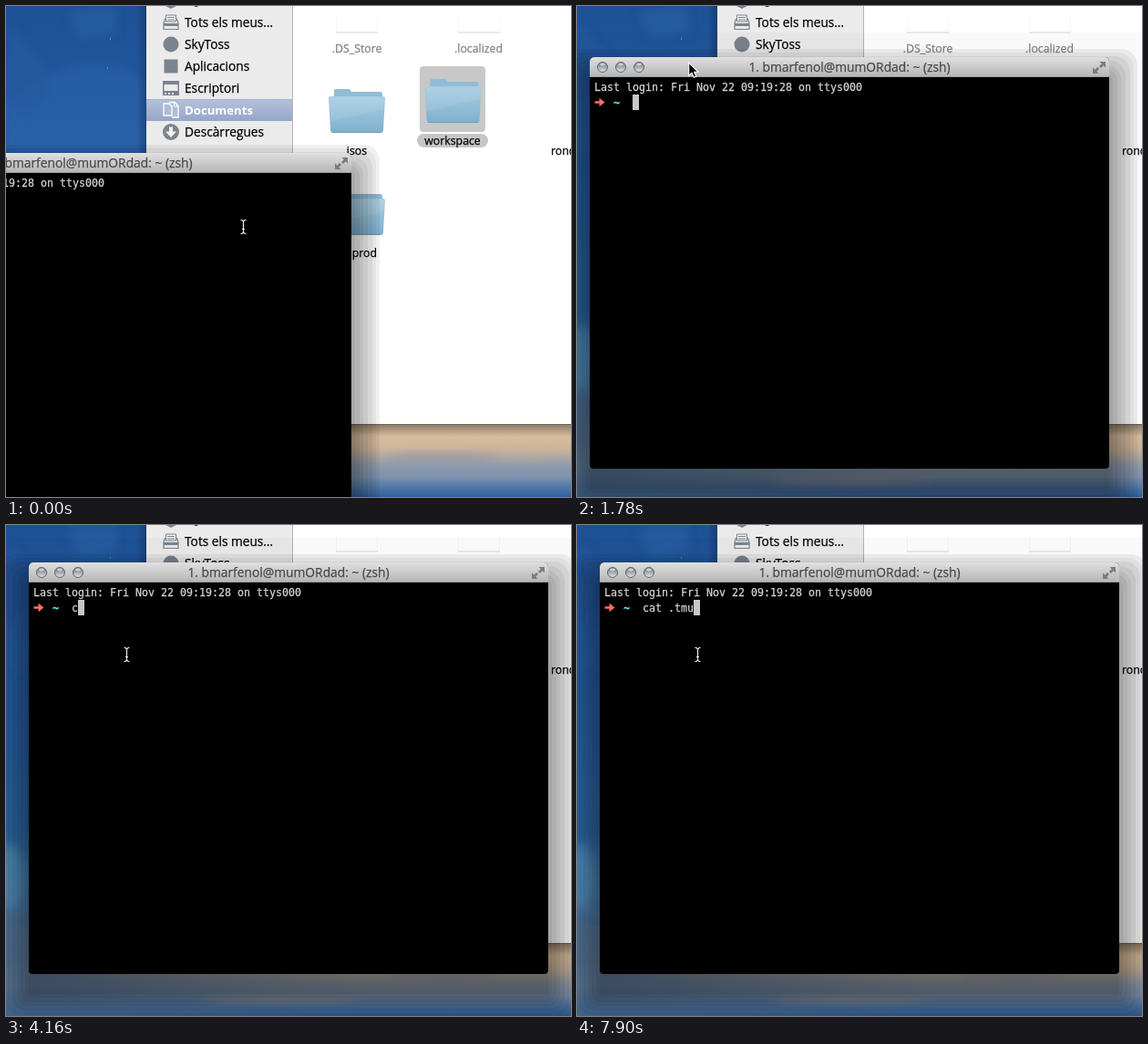
Animation of 620x538 px, one loop 8000 ms. Source, as an HTML page:

```html
<!DOCTYPE html>
<html lang="ca">
<head>
<meta charset="utf-8">
<title>Terminal</title>
<style>
html, body { margin: 0; width: 100%; height: 100%; overflow: hidden; }
body { position: relative; background: #1d4f94; color: #000; }
svg { display: block; }
#desk, #pointers { position: absolute; left: 0; top: 0; }
text {
  font-family: "Open Sans", "Noto Sans", sans-serif; font-weight: 500;
  fill: currentColor; stroke: currentColor; stroke-width: .25px;
}
.side { font-size: 13.7px; }
.side .on { color: #fff; font-weight: 700; font-size: 13.2px; stroke: none; }
.label { font-size: 12.3px; text-anchor: middle; }
.dim { color: #808080; }
.title { color: #484848; font-size: 13.8px; text-anchor: middle; }
.mono { font: 11.63px "DejaVu Sans Mono", monospace; color: #d2d2d2; white-space: pre; }
.mono.path { color: #5ff5fb; font-weight: 700; }

#term {
  position: absolute; left: 0; top: 0; width: 570px; height: 451px;
  border-radius: 5px 5px 4px 4px;
  box-shadow:
    0 22px 0 0 rgba(0,0,0,.05), 0 22px 0 4px rgba(0,0,0,.06),
    0 22px 0 9px rgba(0,0,0,.06), 0 22px 0 13px rgba(0,0,0,.06),
    0 22px 0 18px rgba(0,0,0,.06), 0 22px 0 23px rgba(0,0,0,.06),
    0 22px 0 27px rgba(0,0,0,.05), 0 22px 0 31px rgba(0,0,0,.06);
}
#term::before {
  content: ""; position: absolute; z-index: -1; inset: -27px -49px -90px;
  background: rgba(0,0,0,.025);
}
#term svg { border-radius: inherit; overflow: hidden; }

#term, #term::before, #caret, #beam, #arrow { animation: 8s step-end infinite; }
#term { animation-name: drag; }
#term::before { animation-name: haze; }
#caret { animation-name: type; }
#beam { animation-name: beam; }
#arrow { animation-name: arrow; }

@keyframes drag {
  0% { transform: translate(-191px, 161px); }
  18.625% { transform: translate(-14px, 96px); }
  20.375% { transform: translate(2px, 87px); }
  22.25% { transform: translate(14px, 56px); }
  24.125% { transform: translate(20px, 40px); }
  26% { transform: translate(23px, 39px); }
  27.75% { transform: translate(24px, 41px); }
  29.625%, 100% { transform: translate(25px, 41px); }
}
@keyframes haze {
  0% { opacity: 0; }
  18.625%, 100% { opacity: 1; }
}
@keyframes type {
  0% { transform: translateX(0); }
  52% { transform: translateX(7px); }
  53.875% { transform: translateX(14px); }
  59.5% { transform: translateX(21px); }
  63.125% { transform: translateX(28px); }
  85.625% { transform: translateX(35px); }
  87.5% { transform: translateX(42px); }
  95% { transform: translateX(49px); }
  98.75%, 100% { transform: translateX(56px); }
}
@keyframes beam {
  0% { transform: translate(257px, 234px); }
  1.75% { transform: translate(236px, 209px); }
  3.625% { transform: translate(203px, 185px); }
  5.5% { transform: translate(63px, 184px); }
  7.375% { transform: translate(-40px, 184px); }
  33.25% { transform: translate(129px, 116px); }
  35.125%, 100% { transform: translate(129px, 134px); }
}
@keyframes arrow {
  0% { transform: translate(-40px, 0); }
  18.625% { transform: translate(108px, 101px); }
  20.375% { transform: translate(115px, 84px); }
  22.25% { transform: translate(122px, 61px); }
  24.125% { transform: translate(129px, 51px); }
  26% { transform: translate(133px, 50px); }
  27.75% { transform: translate(134px, 51px); }
  33.25%, 100% { transform: translate(-40px, 0); }
}
</style>
</head>
<body>
<svg id="desk" width="620" height="538">
  <defs>
    <linearGradient id="sea" x2="0" y2="1">
      <stop offset="0" stop-color="#1d5095"/>
      <stop offset=".25" stop-color="#265ca4"/>
      <stop offset=".62" stop-color="#2c68a6"/>
      <stop offset=".72" stop-color="#437fb2"/>
      <stop offset=".86" stop-color="#56779d"/>
      <stop offset=".94" stop-color="#5e7a9c"/>
      <stop offset="1" stop-color="#46709e"/>
    </linearGradient>
    <linearGradient id="dusk" x2="0" y2="1">
      <stop offset=".19" stop-color="#c8ad90"/>
      <stop offset=".3" stop-color="#d8bd9d"/>
      <stop offset=".45" stop-color="#d0b79c"/>
      <stop offset=".55" stop-color="#b0a7a1"/>
      <stop offset=".65" stop-color="#8f9bac"/>
      <stop offset=".78" stop-color="#7c92ae"/>
      <stop offset=".88" stop-color="#557ba7"/>
      <stop offset="1" stop-color="#2f5f9a"/>
    </linearGradient>
    <linearGradient id="reach">
      <stop offset="0" stop-color="#fff" stop-opacity="0"/>
      <stop offset=".3" stop-color="#fff" stop-opacity=".5"/>
      <stop offset=".62" stop-color="#fff"/>
    </linearGradient>
    <mask id="east"><rect y="440" width="620" height="98" fill="url(#reach)"/></mask>
    <linearGradient id="shadeL">
      <stop offset="0" stop-opacity="0"/><stop offset="1" stop-opacity=".22"/>
    </linearGradient>
    <linearGradient id="shadeB" x2="0" y2="1">
      <stop offset="0" stop-opacity=".3"/><stop offset="1" stop-opacity="0"/>
    </linearGradient>
    <linearGradient id="pick" x2="0" y2="1">
      <stop offset="0" stop-color="#b5c1da"/><stop offset="1" stop-color="#95a7c8"/>
    </linearGradient>
    <linearGradient id="front" x2="0" y2="1">
      <stop offset="0" stop-color="#a9cee3"/><stop offset="1" stop-color="#7fb0cd"/>
    </linearGradient>
    <filter id="soft"><feGaussianBlur stdDeviation="5"/></filter>
    <g id="folder">
      <path d="M6 12V3q0-2 2-2h14q2 0 2 2l1 1h32q2 0 2 2v6z" fill="#90bcd5"/>
      <path d="M2 9h58q2 0 2 2l-2 35q0 3-3 3H5q-3 0-3-3L0 11q0-2 2-2z" fill="url(#front)"/>
      <path d="M1 11h60l-1 12L2 37z" fill="#fff" opacity=".08"/>
      <path d="M4 48.500h54" stroke="#6d9dbb"/>
    </g>
    <g id="sheet">
      <path d="M.5 10V29M45.500 10V29" stroke="#f7f7f7"/>
      <path d="M0 28.500H46v1H0z" fill="#d8d8d8"/>
    </g>
  </defs>

  <rect width="620" height="538" fill="url(#sea)"/>
  <g filter="url(#soft)">
    <path d="M66 4L122 0V30L80 36z" fill="#2b62a8" opacity=".5"/>
    <path d="M0 108Q40 70 88 66T154 88V160H0z" fill="#2d65ac" opacity=".5"/>
    <path d="M0 20Q30 40 50 90L20 120 0 100z" fill="#27599f" opacity=".6"/>
    <ellipse cx="4" cy="385" rx="16" ry="34" fill="#5a94c0" opacity=".7"/>
    <ellipse cx="8" cy="455" rx="26" ry="30" fill="#4f7096" opacity=".5"/>
  </g>
  <rect y="440" width="620" height="98" fill="url(#dusk)" mask="url(#east)"/>
  <g filter="url(#soft)">
    <ellipse cx="300" cy="520" rx="85" ry="3" fill="#b09f95" opacity=".7"/>
    <ellipse cx="480" cy="494" rx="62" ry="4" fill="#8590a5" opacity=".6"/>
    <ellipse cx="565" cy="486" rx="60" ry="4" fill="#c4ad98" opacity=".5"/>
  </g>
  <path d="M111 68h1M114 36h1" stroke="#9cbbe0"/>

  <rect x="144" width="10" height="458" fill="url(#shadeL)"/>
  <rect x="154" y="458" width="466" height="14" fill="url(#shadeB)"/>
  <rect x="154" width="466" height="458" fill="#fff"/>
  <rect x="154" width="160" height="458" fill="#ebebeb"/>
  <path d="M314.500 0V458" stroke="#b4b4b4"/>
  <path d="M154 458.500H620" stroke="#6b645e"/>
  <rect x="154" y="102" width="160" height="24" fill="url(#pick)"/>
  <path d="M154 102.500H314" stroke="#a3b2cf"/>

  <g fill="#7b838e">
    <path d="M175 0h12l-6 3z"/>
    <path d="M206 0q3 2 5 0z" fill="#222"/>
    <path d="M175.500 10h11v7h-11z" fill="#f2f2f2" stroke="#7b838e"/>
    <path d="M177 12.500h8M177 15h8" stroke="#7b838e"/>
    <path d="M174.500 14L173 19v6.500h16V19l-1.500-5" fill="none" stroke="#7b838e" stroke-width="1.200"/>
    <path d="M173 19h16v3h-16z"/>
    <circle cx="181" cy="42" r="8.500"/>
    <rect x="173.500" y="58.500" width="15" height="15"/>
    <path d="M172 82h18v16h-18zM173.500 86v7h15v-7z" fill-rule="evenodd"/>
    <path d="M174 95h2v2h-2zM178 95h2v2h-2zM182 95h2v2h-2z" fill="#e6e6e6"/>
    <circle cx="181" cy="138" r="9"/>
    <path d="M179 132.500h4v5h4l-6 6.500-6-6.500h4z" fill="#f2f2f2"/>
  </g>
  <path d="M173 107h6l3 3v10h-9zM179 105.500h6l4 4V122h-7" fill="#aebcd6" stroke="#fff" stroke-width="1.300"/>
  <path d="M184.500 106v4h4" fill="none" stroke="#fff"/>

  <g class="side">
    <text x="196" y="23">Tots els meus…</text>
    <text x="196" y="47">SkyToss</text>
    <text x="196" y="71">Aplicacions</text>
    <text x="196" y="95">Escriptori</text>
    <text x="196" y="119" class="on">Documents</text>
    <text x="196" y="143">Descàrregues</text>
  </g>

  <use href="#sheet" x="362"/>
  <use href="#sheet" x="496"/>
  <rect x="454" y="66" width="72" height="72" rx="4" fill="#c8c8c8"/>
  <rect x="451" y="140" width="78" height="15" rx="7.500" fill="#c6c6c6"/>
  <use href="#folder" x="354" y="90"/>
  <use href="#folder" x="459.500" y="79"/>
  <use href="#folder" x="354" y="202"/>
  <g class="label">
    <text class="dim" x="385" y="51">.DS_Store</text>
    <text class="dim" x="518.500" y="51">.localized</text>
    <text x="385" y="163">isos</text>
    <text x="490" y="152">workspace</text>
    <text x="407" y="275" style="text-anchor:end">web prod</text>
    <text x="598" y="163" style="text-anchor:start">rondes</text>
  </g>
</svg>

<div id="term">
  <svg width="570" height="451">
    <defs>
      <linearGradient id="bar" x2="0" y2="1">
        <stop offset="0" stop-color="#e0e0e0"/><stop offset="1" stop-color="#b4b4b4"/>
      </linearGradient>
      <linearGradient id="knob" x2="0" y2="1">
        <stop offset="0" stop-color="#6d747c"/><stop offset=".5" stop-color="#a3abb3"/>
        <stop offset="1" stop-color="#e2e8ec"/>
      </linearGradient>
      <g id="button">
        <circle r="5.500" fill="url(#knob)" stroke="#5d646c"/>
        <ellipse cy="-3" rx="2.800" ry="1.400" fill="#dfe4e8" opacity=".8"/>
      </g>
    </defs>
    <rect width="570" height="451"/>
    <rect width="570" height="22" fill="url(#bar)"/>
    <path d="M0 21.500H570" stroke="#9a9a9a"/>
    <use href="#button" x="14" y="11"/>
    <use href="#button" x="34" y="11"/>
    <use href="#button" x="54" y="11"/>
    <text class="title" x="285" y="16">1. bmarfenol@mumORdad: ~ (zsh)</text>
    <path d="M559.500 5H566v6.500l-2.200-2.200-2.800 2.800-2-2 2.800-2.800zM552 11.500V18h6.500l-2.200-2.200 2.800-2.800-2-2-2.800 2.800z" fill="#7c7c7c"/>
    <text class="mono" x="5" y="37">Last login: Fri Nov 22 09:19:28 on ttys000</text>
    <path d="M5.500 48.200h5v-3.400l6 4.700-6 4.700v-3.400h-5z" fill="#ff6e67"/>
    <text class="mono path" x="26" y="54">~</text>
    <text class="mono" x="47" y="54">cat .tmu</text>
    <g id="caret">
      <rect x="47" y="41" width="66" height="17"/>
      <rect x="47" y="41" width="7" height="17" fill="#c7c7c7"/>
    </g>
  </svg>
</div>

<svg id="pointers" width="620" height="538">
  <path id="beam" d="M.5.5H2L3.500 2 5 .5H6.500M3.500 2V14M2 10.500H5M.5 15.500H2L3.500 14 5 15.500H6.500" fill="none" stroke="#eee" stroke-width="1.200"/>
  <path id="arrow" d="M.7 1V15.200L4 12.200 6.300 17.300 8.800 16.200 6.600 11.200H10.700z" stroke="#fff" stroke-width="1.100"/>
</svg>
</body>
</html>
```
